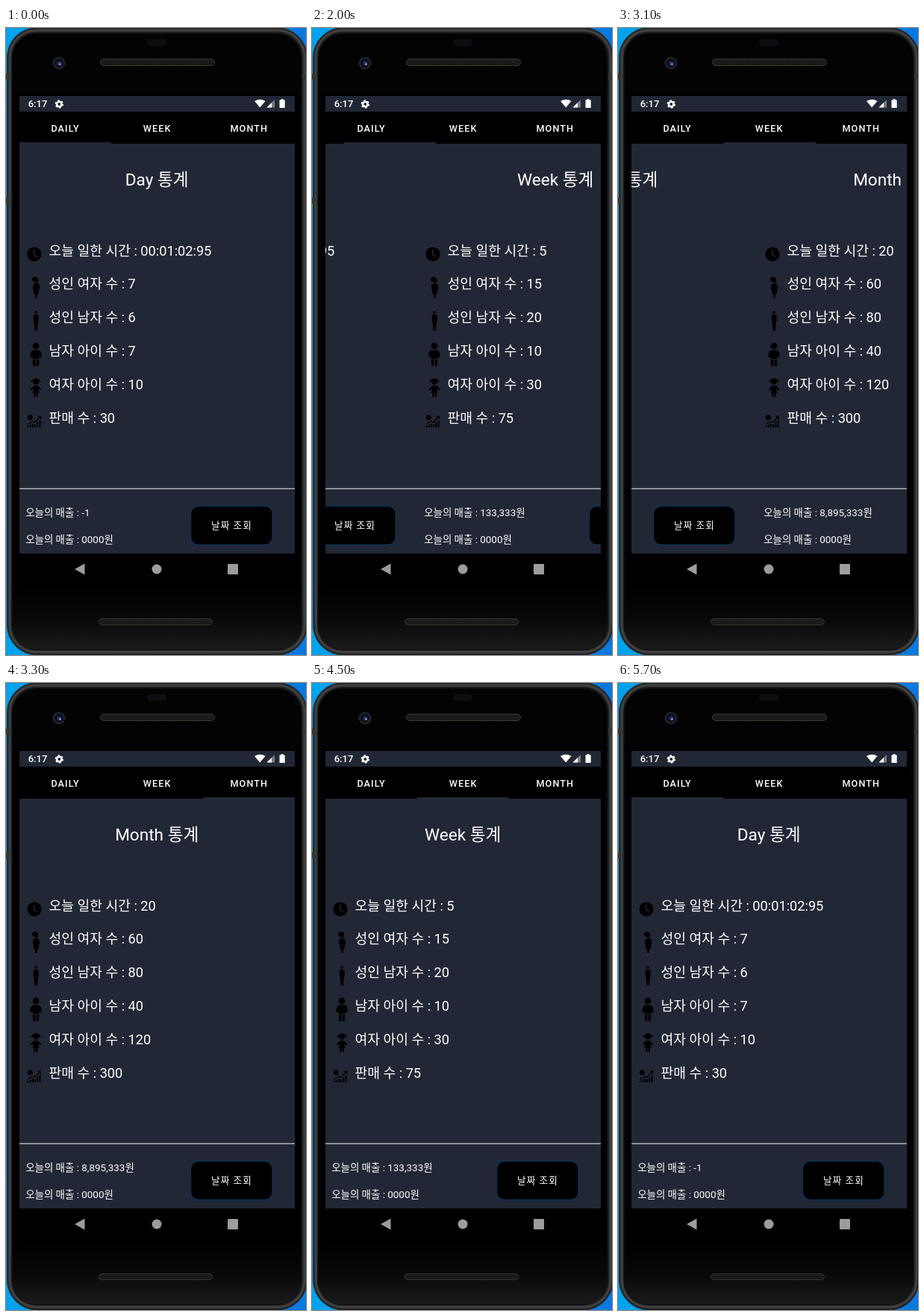
Animation, 402 px wide and 840 px high, one loop 6.4 s. Source, as an HTML page:

```html
<!DOCTYPE html>
<html lang="ko">
<head>
<meta charset="utf-8">
<style>
  html, body { margin: 0; width: 100%; height: 100%; overflow: hidden; background: #000; }
  svg { display: block; }
  text { fill: #fff; font: 18.2px Roboto, "Noto Sans CJK KR", "Noto Sans CJK", sans-serif; white-space: pre; }
  .title { font-size: 22.6px; text-anchor: middle; }
  .small { font-size: 13.45px; }
  .caps { font-size: 12.57px; font-weight: 500; letter-spacing: 1.12px; text-anchor: middle; }
  .clock { font-size: 13px; font-weight: 500; }
</style>
</head>
<body>
<svg width="402" height="840" viewBox="0 0 402 840">
  <defs>
    <linearGradient id="sky" x2="1" y2="0">
      <stop stop-color="#00a3ee"/><stop offset="1" stop-color="#0a78de"/>
    </linearGradient>
    <linearGradient id="chin" x2="0" y2="1">
      <stop stop-color="#000"/><stop offset=".5" stop-color="#070707"/><stop offset="1" stop-color="#1a1a1a"/>
    </linearGradient>
    <filter id="soft"><feGaussianBlur stdDeviation="1.2"/></filter>
    <pattern id="mesh" width="3" height="3" patternUnits="userSpaceOnUse">
      <rect width="3" height="3" fill="#161614"/><circle cx="1.5" cy="1.5" r=".8" fill="#2b2a26"/>
    </pattern>
    <clipPath id="screen"><rect x="18" y="153" width="369" height="551"/></clipPath>

    <g id="icons">
      <circle cx="38" cy="303" r="9.6"/>
      <path d="M37.6 297v6.4l4.6 3.6" fill="none" stroke="#222735" stroke-width="1.5"/>
      <g id="woman">
        <circle cx="40.500" cy="338.500" r="2.800"/>
        <path d="M34.500 335.500l4-2.500 4.500 2-.5 2-4 .5-2 3zM36.500 343.500l2-1.500h4l2 1.500.8 5-1.300 3 .2 3.500-2 1.500-.6 5.500h-2.200l-.6-5.500-2-1.500.2-3.500-1.300-3z"/>
      </g>
      <g id="man">
        <circle cx="40" cy="381" r="2"/>
        <path d="M37.500 384h5q1.200 0 1.200 1.500v8h-1l-.5 12h-1.600l-.4-9-.4 9h-1.600l-.5-12h-1v-8q0-1.500 1.200-1.500z"/>
      </g>
      <g id="boy">
        <circle cx="40" cy="426" r="4.400"/>
        <path d="M36 431.500h8q3 .5 3.800 8l-.8 2h-2l-.6-4v6h-8.800v-6l-.6 4h-2l-.8-2q.8-7.500 3.800-8zM35.700 444.500h3.700v8.500h-3.200zM40.600 444.500h3.700l-.5 8.500h-3.200z"/>
      </g>
      <g id="girl">
        <circle cx="40" cy="474" r="3.800"/>
        <path d="M35.500 471q4.500-3.500 9 0l3 3.500-3.500-.5h-8l-3.500.5zM37.500 479h5l5 5-1.200 1.600-3.300-2 1.500 5.400h-1.700v5.500h-2.200v-5h-1.200v5h-2.200V489h-1.700l1.500-5.400-3.300 2L32.500 484z"/>
      </g>
      <g id="sales">
        <circle cx="32.300" cy="521.700" r="3.500"/>
        <path d="M29 531l6.500-4 3 1.500 6-6.500" fill="none" stroke="#000" stroke-width="1.300"/>
        <path d="M42 519.500h5v5zM28.500 533h2v2h-2zM31.700 531.500h2v3.500h-2zM34.900 530h2v5h-2zM38.100 531h2v4h-2zM41.300 528h2v7h-2zM44.500 525.500h2v9.500h-2z"/>
      </g>
    </g>
  </defs>

  <rect width="402" height="840" fill="url(#sky)"/>
  <rect x="1.500" y="-.5" width="402" height="840.500" rx="40" fill="#161616" stroke="#2c2c2c"/>
  <rect x="5" y="3" width="395" height="833" rx="36" fill="none" stroke="#505050" stroke-width="3" filter="url(#soft)"/>
  <rect x="8" y="7" width="388" height="826" rx="33" fill="#030303" stroke="#161616"/>
  <path d="M9 745H395V800Q395 832 364 832H40Q9 832 9 800z" fill="url(#chin)"/>
  <rect x="12" y="88" width="380" height="660" fill="#000"/>
  <path d="M0 61h5v8H0zM0 227h5v8H0zM397 61h5v8h-5z" fill="#343434"/>
  <rect x="189" y="15" width="26" height="9" rx="4.500" fill="#0e0e12"/>
  <circle cx="71" cy="47" r="8.600" fill="#202228"/>
  <circle cx="71" cy="47" r="6" fill="#0c0f1e"/>
  <circle cx="71.500" cy="47.500" r="2.800" fill="#26376c"/>
  <circle cx="72.500" cy="48.500" r="1.200" fill="#8fa6e8"/>
  <g fill="url(#mesh)" stroke="#383731">
    <rect x="126.500" y="41.500" width="153" height="9" rx="4.500"/>
    <rect x="124.500" y="791.500" width="152" height="8" rx="4"/>
  </g>

  <rect x="18" y="91" width="369" height="21" fill="#222735"/>
  <text class="clock" x="29.700" y="106.300">6:17</text>
  <g fill="#fff">
    <circle cx="71.300" cy="102" r="3.300" fill="none" stroke="#fff" stroke-width="2.600"/>
    <circle cx="71.300" cy="102" r="4.800" fill="none" stroke="#fff" stroke-width="1.800" stroke-dasharray="2.500 2.527"/>
    <path d="M333 98q7.500-4.500 14.500 0L340.200 106.500z"/>
    <path d="M349.500 106.500l10.500-10.500v10.500z" opacity=".4"/>
    <path d="M349.500 106.500l6.500-6.500v6.500z"/>
    <path d="M366.500 96.500h2v-1.300h3.200v1.300h2v10.500h-7.200z"/>
  </g>

  <g clip-path="url(#screen)">
    <rect x="18" y="153" width="369" height="551" fill="#222735"/>
    <g id="pager"></g>
  </g>
  <rect x="18" y="112" width="369" height="43" fill="#000"/>
  <rect id="marker" x="18" y="153" width="123" height="2" fill="#222735"/>
  <text class="caps" x="79.600" y="138.500">DAILY</text>
  <text class="caps" x="202.600" y="138.500">WEEK</text>
  <text class="caps" x="325.800" y="138.500">MONTH</text>

  <g fill="#9c9c9c">
    <path d="M92 725l13.500-7.500v15z"/>
    <circle cx="202" cy="725" r="6.500"/>
    <rect x="297" y="718" width="14" height="14" rx="1"/>
  </g>
</svg>
<script>
const WIDTH = 369, TAB = 123, LOOP = 6400;
const labels = ['오늘 일한 시간', '성인 여자 수', '성인 남자 수', '남자 아이 수', '여자 아이 수', '판매 수'];
const pages = [
  { name: 'Day', values: ['00:01:02:95', 7, 6, 7, 10, 30], sales: '-1' },
  { name: 'Week', values: [5, 15, 20, 10, 30, 75], sales: '133,333원' },
  { name: 'Month', values: [20, 60, 80, 40, 120, 300], sales: '8,895,333원' }
];

const text = (x, y, str, cls = '') => `<text x="${x}" y="${y}" class="${cls}">${str}</text>`;

const drawPage = ({ name, values, sales }, i) => `
  <g transform="translate(${i * WIDTH})">
    ${text(202.2, 211, name + ' 통계', 'title')}
    <use href="#icons"/>
    ${labels.map((label, row) => text(57.5, 304.5 + row * 44.8, `${label} : ${values[row]}`)).join('')}
    <rect x="18" y="616.500" width="369" height="1.300" fill="#c9cbd0"/>
    ${text(26.2, 654.2, '오늘의 매출 : ' + sales, 'small')}
    ${text(26.2, 690.2, '오늘의 매출 : 0000원', 'small')}
    <rect x="247.500" y="640.500" width="109.500" height="52" rx="10" fill="#000" stroke="#0b3358" stroke-width="1.300"/>
    ${text(302.5, 671.3, '날짜 조회', 'caps')}
  </g>`;

const pager = document.getElementById('pager');
const marker = document.getElementById('marker');
pager.innerHTML = pages.map(drawPage).join('');

// time, scroll in px, marker position in tabs
const steps = [
  [0, 0, 0],
  [1900, 60, 0], [2000, 245, 0.2], [2100, 355, 0.85], [2200, WIDTH, 1],
  [3100, WIDTH + 200, 1.01], [3200, WIDTH + 350, 1.8], [3300, WIDTH * 2, 2],
  [4300, WIDTH * 2 - 200, 1.99], [4400, WIDTH + 19, 1.2], [4500, WIDTH, 1],
  [5500, WIDTH - 200, 0.99], [5600, 19, 0.2], [5700, 0, 0],
  [LOOP, 0, 0]
];

function play(el, shift) {
  const frames = steps.map(step => ({
    offset: step[0] / LOOP,
    transform: `translateX(${shift(step)}px)`,
    easing: 'step-end'
  }));
  el.animate(frames, { duration: LOOP, iterations: Infinity });
}

play(pager, ([, scroll]) => -scroll);
play(marker, ([, , tab]) => tab * TAB);
</script>
</body>
</html>
```
